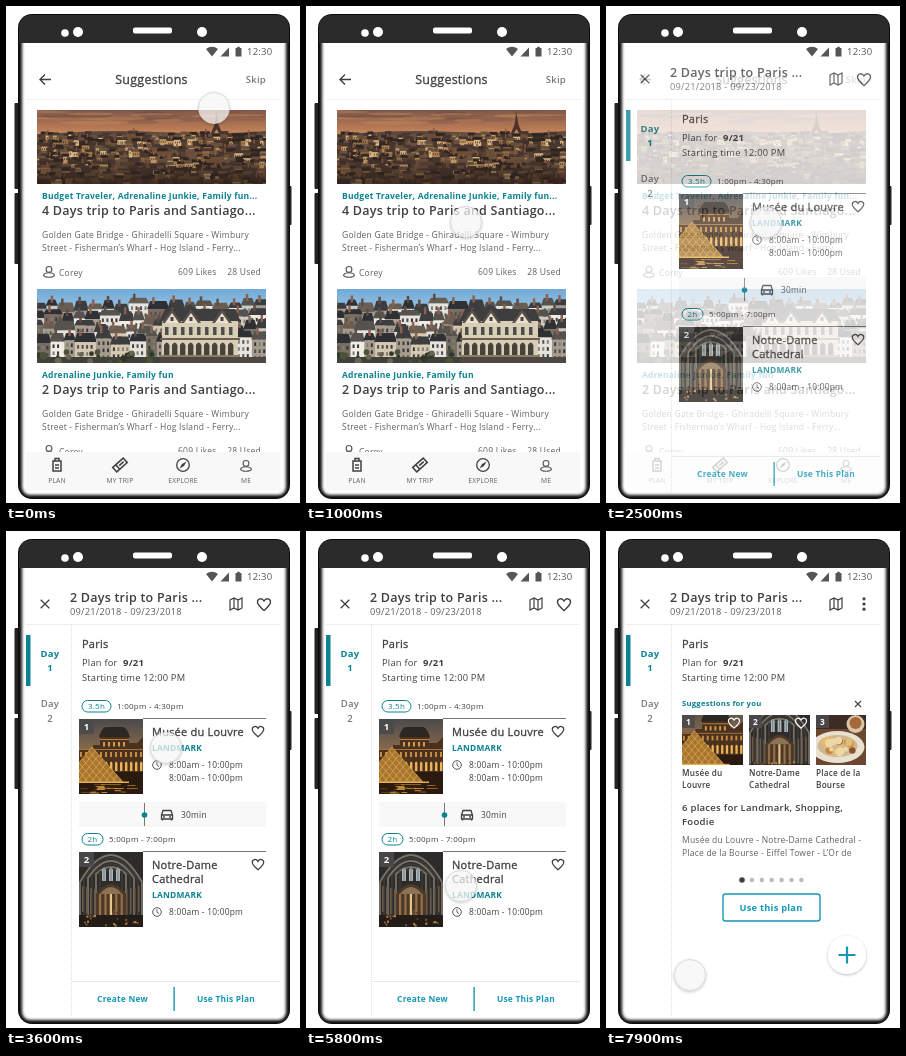
Recreate the animation shown at these times as an HTML page. Size 294 by 497 pixels, loop 8 s.

```html
<!DOCTYPE html>
<html lang="en">
<head>
<meta charset="utf-8">
<title>Trip planner walkthrough</title>
<style>
html, body { margin: 0; width: 100%; height: 100%; overflow: hidden; background: #fff; }
svg { display: block; }
#stage { font-family: "Open Sans", "Noto Sans", sans-serif; letter-spacing: .23px; }
</style>
</head>
<body>
<svg id="stage" width="294" height="497" viewBox="0 0 294 497"></svg>
<script>
const TEAL = '#0a8291', CYAN = '#1597b5', INK = '#3f3f3f', SOFT = '#606060';

let seed = 1;
const rnd = (a = 0, b = 1) => {
  seed = (seed * 16807) % 2147483647;
  return a + (b - a) * seed / 2147483647;
};
const pick = list => list[Math.floor(rnd(0, list.length))];

const rect = (x, y, w, h, fill, extra = '') =>
  `<rect x="${x}" y="${y}" width="${w}" height="${h}" fill="${fill}" ${extra}/>`;
const dot = (x, y, r, fill, extra = '') => `<circle cx="${x}" cy="${y}" r="${r}" fill="${fill}" ${extra}/>`;
const fillPath = (d, fill, extra = '') => `<path d="${d}" fill="${fill}" ${extra}/>`;
const line = (d, color = INK, w = 1.3, extra = '') =>
  `<path d="${d}" fill="none" stroke="${color}" stroke-width="${w}" ${extra}/>`;
// A hairline stroke gives the medium weight between regular and semibold.
const text = (x, y, size, str, fill = SOFT, weight = 400, anchor = 'start') =>
  `<text x="${x}" y="${y}" font-size="${size}" fill="${fill}" font-weight="${weight}" text-anchor="${anchor}"` +
  `${weight === 500 ? ` stroke="${fill}" stroke-width=".3"` : ''}>${str}</text>`;
const at = (x, y, body) => `<g transform="translate(${x} ${y})">${body}</g>`;
const picture = (x, y, w, h, vw, vh, body) =>
  `<svg x="${x}" y="${y}" width="${w}" height="${h}" viewBox="0 0 ${vw} ${vh}" preserveAspectRatio="xMidYMid slice">${body}</svg>`;
const gradient = (id, ...stops) => `<linearGradient id="${id}" x2="0" y2="1">${stops.map((c, i) =>
  `<stop offset="${i / (stops.length - 1)}" stop-color="${c}"/>`).join('')}</linearGradient>`;

// Icons
const cross = (x, y, r, w = 1.3) => line(`M${x - r} ${y - r}l${2 * r} ${2 * r}m0 ${-2 * r}l${-2 * r} ${2 * r}`, INK, w);
const heart = (x, y, s = 1, color = INK) => `<g transform="translate(${x} ${y}) scale(${s})">` +
  line('M0 6C-4 2.5-6.5.5-6.5-2.5C-6.5-6-2-7 0-3.5C2-7 6.5-6 6.5-2.5C6.5.5 4 2.5 0 6Z', color, 1.4) + '</g>';
const clock = (x, y) => dot(x, y, 4.3, 'none', 'stroke="#555"') + line(`M${x} ${y - 2.7}v3l2 1.2`, '#555', .9);
const person = (x, y) => dot(x, y - 2.6, 2.9, 'none', 'stroke="#555" stroke-width="1.1"') +
  line(`M${x - 5.5} ${y + 3.2}q1-2.4 5.5-2.4t5.5 2.4q-1 2-5.5 2t-5.5-2z`, '#555', 1.1);
const car = (x, y) => at(x, y, line('M-5.5 0L-4-4.5H4L5.5 0V4H-5.5ZM-5.5 0H5.5M-4.5 4v1.6M4.5 4v1.6', INK, 1.3) +
  dot(-3, 2, .9, INK) + dot(3, 2, .9, INK));
const mapIcon = (x, y) => at(x, y, line('M-6-4L-2-6L2-4L6-6V4L2 6L-2 4L-6 6ZM-2-6V4M2-4V6', INK, 1.2));

// Pictures
function sunsetCity() {
  let s = rect(0, 0, 229, 74, 'url(#dusk)');
  for (let i = 0; i < 22; i++)
    s += `<ellipse cx="${rnd(0, 229)}" cy="${rnd(0, 13)}" rx="${rnd(14, 40)}" ry="${rnd(.8, 2.2)}" fill="${pick(['#5d463f', '#c98a5c', '#7a5546'])}" opacity=".4"/>`;
  s += fillPath('M0 25Q60 19 120 22T229 21V40H0Z', '#5c473c');
  s += fillPath('M179 1l1.5 8 1 6 4 9h-3l-3-5-3 5h-3l4-9 1-6Z', '#4b322b');
  for (let row = 0; row < 9; row++)
    for (let x = -4; x < 229;) {
      const w = rnd(3, 9), y = 22 + row * 5.6 + rnd(0, 5);
      const lit = rnd() < .5 - row * .025;
      s += rect(x, y, w, 22, pick(lit ? ['#c99e68', '#b1844f', '#dab884', '#9a7047'] : ['#59402f', '#3f2e26', '#6d4d36', '#4a372d']));
      s += rect(x - 1, y - 1.5, w + 2, 3, pick(['#2f2624', '#463630', '#66503f']));
      if (lit) for (let k = 1; k < w - 1; k += 2) s += rect(x + k, y + 3, .9, 2, '#5a4130');
      if (rnd() < .25) s += rect(x + w / 2, y - 4, 1.5, 4, '#86573b');
      x += w;
    }
  return s + rect(0, 48, 229, 26, 'url(#dim)');
}

function townHouses() {
  let s = rect(0, 0, 229, 74, 'url(#day)');
  for (let row = 0; row < 4; row++)
    for (let x = -6; x < 229;) {
      const w = rnd(10, 21), y = 8 + row * 11 + rnd(0, 7), roof = rnd(5, 10);
      s += rect(x, y + roof, w, 60, pick(['#e6e3dc', '#cfcac0', '#f0ece4', '#a69b8c', '#d6c8b0', '#796c60']));
      s += fillPath(`M${x - 1} ${y + roof}l3-${roof}h${w - 4}l3 ${roof}z`, pick(['#3d3d40', '#55534f', '#2f3034', '#6a5d52']));
      s += rect(x + 4, y - 4, 2.5, 7, pick(['#8b6251', '#5d4d45']));
      for (let k = 2; k < w - 3; k += 4.5)
        for (let j = 0; j < 3; j++) s += rect(x + k, y + roof + 3 + j * 7, 2, 3.6, pick(['#4c4f52', '#35393d', '#7b8078']));
      x += w;
    }
  s += fillPath('M122 33L128 20H146L153 15L160 20H198L204 33Z', '#3f3e3f') + rect(125, 32, 76, 42, '#d8cdb6');
  for (const x of [128, 147, 178])
    s += fillPath(`M${x - 3} 34L${x + 7} 20L${x + 17} 34Z`, '#5b5049') + fillPath(`M${x} 34L${x + 7} 24L${x + 14} 34Z`, '#eae2d0') +
      rect(x + 5.5, 28, 3, 4, '#46433f');
  for (let i = 0; i < 9; i++)
    s += rect(128 + i * 8, 38, 3.5, 8, '#514d48') + fillPath(`M${127 + i * 8} 66v-10q2.7-5 5.4 0v10z`, '#48423c');
  s += rect(123, 49, 80, 2, '#6b5f52') + rect(123, 66, 80, 2, '#8d7d68') + rect(123, 68, 106, 6, '#4d4840');
  s += rect(0, 68, 123, 6, '#3f4238');
  for (let i = 0; i < 22; i++) s += dot(rnd(0, 120), rnd(63, 73), rnd(1.5, 4), pick(['#2f3828', '#4c5238', '#6c6350']));
  return s;
}

function museum() {
  let s = rect(0, 0, 64, 75, 'url(#night)');
  s += fillPath('M0 30H14V26H21V17Q23 9 27 8H44Q48 9 50 17V24H58L64 18V56H0Z', '#4b321f');
  s += fillPath('M20 18Q23 8 27 8H44Q48 9 51 18Z', '#2d2723') + rect(0, 30, 64, 1, '#a8743a') + rect(21, 20, 29, 1, '#b98243');
  for (let i = 0; i < 13; i++)
    s += rect(1 + i * 5, 33, 2, 5, '#c58b40') + fillPath(`M${1 + i * 5} 52v-8q1.2-3 2.4 0v8z`, '#edb455');
  for (let i = 0; i < 5; i++) s += rect(24 + i * 5, 23, 2, 4.5, '#d19a4c');
  s += rect(0, 53, 64, 22, '#2b1a10') + fillPath('M-16 63L13 28L44 63Z', '#a8752e');
  for (let i = 0; i < 9; i++)
    s += line(`M${-16 + i * 7} 63L${13 + i * 3.6} ${28 + i * 4}M${44 - i * 7} 63L${13 - i * 3.2} ${28 + i * 4}`, '#e6b863', .6);
  s += rect(0, 62.5, 50, 1.5, '#e6ae4c');
  for (let i = 0; i < 26; i++) s += rect(rnd(-4, 50), rnd(65, 74), rnd(3, 12), .8, pick(['#b07a2c', '#714619', '#d79f43']));
  return s;
}

function cathedral() {
  let s = rect(0, 0, 64, 75, '#2d2c2a');
  for (let i = 0; i < 6; i++)
    s += line(`M${1 + i * 4} 75V${30 - i * 2}Q32 ${-24 + i * 8} ${63 - i * 4} ${30 - i * 2}V75`, i % 2 ? '#3d3a36' : '#77736b', 1.8);
  for (let i = 0; i < 3; i++) s += fillPath(`M${23 + i * 7} 29V18q2-5 4 0v11z`, '#a9b7bb') + rect(24.7 + i * 7, 16, .6, 13, '#515b60');
  for (let i = 0; i < 4; i++)
    s += rect(3 + i * 4, 34 + i, 1.6, 26, '#675848') + rect(59 - i * 4, 34 + i, 1.6, 26, '#675848');
  s += fillPath('M17 66V42Q32 22 47 42V66Z', '#4e3827') + fillPath('M21 42Q32 28 43 42Z', '#8b7355');
  for (let i = 0; i < 5; i++) s += rect(20 + i * 5.4, 42, 2.2, 22, i === 2 ? '#e3c88a' : '#94724a');
  s += rect(0, 63, 64, 12, '#231c17');
  for (let i = 0; i < 24; i++) s += rect(rnd(2, 60), rnd(56, 73), 2, 2, pick(['#7b5834', '#b58a50', '#513b28']));
  return s;
}

function dinner() {
  let s = rect(0, 0, 61, 50, '#6b4630') + rect(0, 0, 61, 14, '#3d2c24');
  s += '<ellipse cx="27" cy="32" rx="27" ry="16" fill="#e9e0d0"/><ellipse cx="27" cy="31" rx="20" ry="11" fill="#cfb791"/>';
  for (let i = 0; i < 22; i++) s += dot(rnd(12, 42), rnd(23, 38), rnd(2, 4), pick(['#c5853c', '#e4bb6f', '#8b5429', '#f0d7a5']));
  return s + dot(45, 9, 9, '#d9c5a7') + dot(45, 8, 6, '#a6673b');
}

// Screens
const base = rect(20, 36, 254, 449, '#fff');

function card(y, photo, tags, days) {
  return at(0, y, picture(31, 0, 229, 74, 229, 74, photo) +
    text(36, 89, 8.5, tags, TEAL, 700) +
    text(36, 105, 12.5, `${days} Days trip to Paris and Santiago...`, INK, 600) +
    text(36, 128, 8.5, 'Golden Gate Bridge - Ghiradelli Square - Wimbury') +
    text(36, 141, 8.5, 'Street - Fisherman’s Wharf - Hog Island - Ferry...') +
    person(43, 162) + text(53, 166, 8.5, 'Corey') +
    text(172, 165, 8.5, '609 Likes') + text(255, 165, 8.5, '28 Used', SOFT, 400, 'end'));
}

function listScreen() {
  const icons = [
    line('M-4-4H4V6H-4ZM-2-4V-6.5H2V-4M-2 0H2M-2 3H2', INK, 1.5),
    `<g transform="rotate(-42)">${line('M-7-3H7V3H-7ZM-3-3V3M-1 0H5', INK, 1.6)}</g>`,
    dot(0, 0, 6.3, 'none', 'stroke="#444" stroke-width="1.3"') + fillPath('M3.5-3.5L1 1L-3.5 3.5L-1-1Z', INK),
    person(0, 1)
  ];
  return base + line('M34.5 73.5H45M39 68.5l-5 5 5 5', INK, 1.4) +
    text(145.5, 78, 12.5, 'Suggestions', INK, 500, 'middle') + text(260, 77, 9.5, 'Skip', '#777', 600, 'end') +
    rect(20, 93, 254, 1, '#f0f0f0') +
    card(104, sunsetCity(), 'Budget Traveler, Adrenaline Junkie, Family fun...', 4) +
    card(283, townHouses(), 'Adrenaline Junkie, Family fun', 2) +
    rect(20, 446, 254, 39, '#f8f8f8') +
    ['PLAN', 'MY TRIP', 'EXPLORE', 'ME'].map((s, i) =>
      at(51 + i * 63, 459, icons[i]) + text(51 + i * 63, 477, 6.7, s, SOFT, 400, 'middle')).join('');
}

function planFrame(action) {
  return base + cross(39, 73, 4.3) + text(64, 70.5, 12.5, '2 Days trip to Paris ...', INK, 600) +
    text(64, 84, 9.3, '09/21/2018 - 09/23/2018') + mapIcon(230, 73) + action +
    rect(20, 93, 254, 1, '#eee') +
    line('M65.5 94V485', '#ddd', 1, 'stroke-dasharray="1 1"') + rect(20, 104, 4.5, 51, TEAL) +
    text(44, 126, 9.5, 'Day', TEAL, 700, 'middle') + text(44, 140, 9.5, '1', TEAL, 700, 'middle') +
    text(44, 176, 9.5, 'Day', '#777', 600, 'middle') + text(44, 191, 9.5, '2', '#777', 600, 'middle') +
    text(76, 117, 11, 'Paris', INK, 500) + text(76, 135, 9.3, 'Plan for', INK) +
    text(117, 135, 9.5, '9/21', INK, 700) + text(76, 150, 9.3, 'Starting time 12:00 PM', INK);
}

const badge = (x, y, size, n) => rect(x, y, size, size, '#4b4b4b', 'opacity=".9"') +
  text(x + size / 2, y + size * .76, size * .64, n, '#fff', 700, 'middle');

function stop(y, n, photo, length, times, name, hours) {
  const end = 17 + (name.length - 1) * 14;
  const pill = length.length > 2 ? 29 : 21;
  return at(0, y, `<rect x="76" y="-18.5" width="${pill}" height="11.5" rx="5.7" fill="#fff" stroke="${TEAL}"/>` +
    text(76 + pill / 2, -9.8, 8, length, TEAL, 400, 'middle') + text(82 + pill, -10, 8, times, INK) +
    rect(137, -1, 123, 1, '#777') + picture(73, 0, 64, 75, 64, 75, photo) + badge(73, 0, 15, n) +
    name.map((s, i) => text(146, 17 + i * 14, 11, s, INK, 500)).join('') + heart(252, 12.5, .88) +
    text(146, end + 15, 8.4, 'LANDMARK', TEAL, 700) + clock(151, end + 29) +
    hours.map((s, i) => text(163, end + 32 + i * 13, 8.4, s, INK)).join(''));
}

function planScreen() {
  return planFrame(heart(258, 73.5)) +
    stop(188, 1, museum(), '3.5h', '1:00pm - 4:30pm', ['Musée du Louvre'], ['8:00am - 10:00pm', '8:00am - 10:00pm']) +
    rect(73, 271, 187, 25, '#f8f8f8') + line('M138.5 272V295', '#777', 1) + dot(138.5, 284, 2.8, TEAL) +
    car(161, 284) + text(175, 287, 8.4, '30min', INK) +
    stop(321, 2, cathedral(), '2h', '5:00pm - 7:00pm', ['Notre-Dame', 'Cathedral'], ['8:00am - 10:00pm']) +
    rect(65, 450, 209, 1, '#e8e8e8') + rect(167.4, 456, 1.4, 24, CYAN) +
    text(116.5, 471, 8.4, 'Create New', CYAN, 700, 'middle') + text(220, 471, 8.4, 'Use This Plan', CYAN, 700, 'middle');
}

function newScreen() {
  const thumbs = [[museum(), 'Musée du', 'Louvre'], [cathedral(), 'Notre-Dame', 'Cathedral'], [dinner(), 'Place de la', 'Bourse']];
  return planFrame([67.8, 73, 78.2].map(y => dot(258, y, 1.6, INK)).join('')) +
    text(76, 174.5, 7.7, 'Suggestions for you', TEAL, 700) + cross(252, 173, 3, 1.1) +
    thumbs.map(([photo, a, b], i) => {
      const x = 76 + i * 67, w = i < 2 ? 61 : 50;
      return picture(x, 184, w, 50, i < 2 ? 64 : 61, i < 2 ? 75 : 50, photo) + badge(x, 184, 13, i + 1) +
        (i < 2 ? heart(x + 52, 192, .85, '#fff') : '') +
        text(x, 245, 8.2, a, INK, 600) + text(x, 257, 8.2, b, INK, 600);
    }).join('') +
    text(76, 280, 9.6, '6 places for Landmark, Shopping,', INK, 600) + text(76, 294, 9.6, 'Foodie', INK, 600) +
    text(76, 312, 8.5, 'Musée du Louvre - Notre-Dame Cathedral -') +
    text(76, 325, 8.5, 'Place de la Bourse - Eiffel Tower - L’Or de') +
    [...Array(7)].map((_, i) => dot(136 + i * 9.9, 349, i ? 2.2 : 2.8, i ? '#bbb' : INK)).join('') +
    `<rect x="117" y="363" width="97" height="27" rx="2.5" fill="#fff" stroke="${CYAN}" stroke-width="1.4"/>` +
    text(165, 380, 9.3, 'Use this plan', CYAN, 700, 'middle') +
    dot(241, 424, 19, '#fff', 'filter="url(#shadow)"') + line('M232.5 424h17M241 415.5v17', CYAN, 2.2);
}

// The blurred glass fades from the dark rim into the white screen.
const phone =
  rect(8.5, 97, 5, 86, '#222', 'rx="1"') + rect(8.5, 187, 5, 71, '#222', 'rx="1"') + rect(281, 180, 4.5, 39, '#222', 'rx="1"') +
  rect(12, 8, 272, 485, '#0c0c0c', 'rx="14"') +
  rect(16, 24, 264, 465, '#fff', 'rx="8" filter="url(#soft)"') +
  fillPath('M13 37V22Q13 9 26 9H270Q283 9 283 22V37Z', '#2b2b2b') +
  dot(59, 27, 3.8, '#fff') + dot(72, 26, 5, '#fff') + rect(127, 21.5, 39, 6, '#fff', 'rx="2"') + dot(196, 26, 5, '#fff');

const statusBar = fillPath('M200 43Q206 38.5 212 43L206 50.5Z', '#555') + fillPath('M214.5 50.5L223 41.5V50.5Z', '#555') +
  rect(229.5, 42, 6, 8.5, '#555', 'rx=".6"') + rect(231.2, 40.8, 2.6, 2, '#555') + text(241, 49.3, 9.5, '12:30', '#555');

const stage = document.getElementById('stage');
stage.innerHTML = '<defs>' + gradient('dusk', '#80584a', '#b87a55', '#e8b577', '#54403a', '#54403a') +
  gradient('day', '#70a9d7', '#b7d7ec', '#c9dbe3') + gradient('night', '#4b4a4c', '#94704b', '#3a2514') +
  gradient('dim', '#2a1d1600', '#2a1d16a0') +
  '<filter id="soft"><feGaussianBlur stdDeviation="1.5"/></filter>' +
  '<filter id="shadow" x="-40%" y="-40%" width="180%" height="180%"><feDropShadow dx="0" dy="1" stdDeviation="1.6" flood-opacity=".28"/></filter>' +
  '<clipPath id="screen"><rect x="20" y="37" width="254" height="448"/></clipPath></defs>' + phone +
  `<g clip-path="url(#screen)">${listScreen()}<g id="plan">${planScreen()}</g><g id="fresh">${newScreen()}</g>${statusBar}</g>` +
  `<g id="touch">${dot(0, 0, 15.5, '#fff', 'fill-opacity=".68" stroke="#d2d2d2" stroke-width=".8" filter="url(#shadow)"')}</g>`;

const plan = document.getElementById('plan');
const fresh = document.getElementById('fresh');
const touch = document.getElementById('touch');

// Touch path: time, x, y
const path = [[0, 208, 102], [900, 160, 216], [4800, 160, 217], [5600, 155, 355],
  [5900, 155, 355], [6400, 124, 465], [7200, 124, 465], [7850, 84, 444], [8000, 84, 444]];

const progress = (t, a, b) => Math.min(1, Math.max(0, (t - a) / (b - a)));
const ease = p => p * p * (3 - 2 * p);

function draw(now) {
  const t = now % 8000;
  const i = path.findIndex(p => p[0] > t);
  const [t0, x0, y0] = path[i - 1], [t1, x1, y1] = path[i];
  const p = ease(progress(t, t0, t1));
  touch.setAttribute('transform', `translate(${x0 + (x1 - x0) * p} ${y0 + (y1 - y0) * p})`);
  plan.setAttribute('opacity', progress(t, 2120, 2610));
  fresh.setAttribute('opacity', progress(t, 6530, 7020));
  requestAnimationFrame(draw);
}
draw(performance.now());
</script>
</body>
</html>
```
